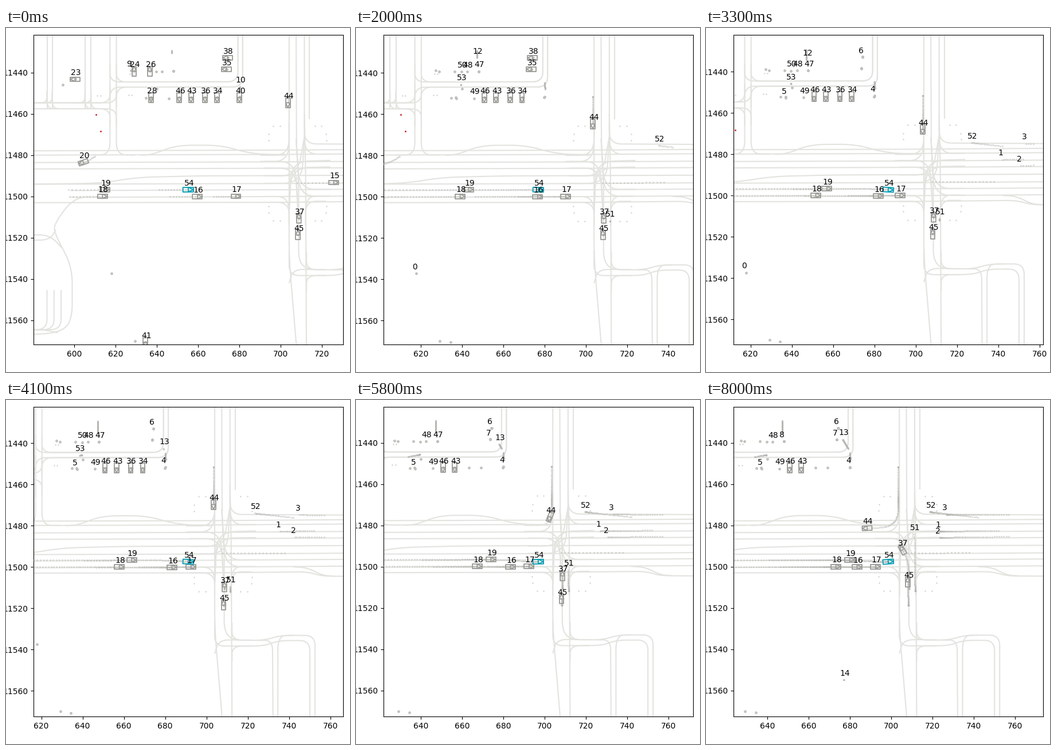
Recreate the animation shown at these times as a matplotlib script. Size 600 px wide and 600 px high, loop 8100 ms.

```python
import numpy as np
import matplotlib.pyplot as plt
from matplotlib.animation import FuncAnimation
from matplotlib.collections import LineCollection, PolyCollection

FRAMES, STEP = 81, 100
Y0 = 11400          # all y values below are relative to this northing
SPAN = 75           # half width of the view
PX = 0.72           # points per pixel
LANE, GREY, EGO = "#e3e3df", "#9c9c98", "#0a9fb6"
TRAIL, DOT, DOT_EDGE, SIGNAL = "#b6b6b2", "#cacac6", "#b2b2ae", "#d6d6d2"
WEST, EAST = 560, 790
UP, DOWN, LEFT, RIGHT = -90, 90, 180, 0

fig = plt.figure(figsize=(6, 6), dpi=100, facecolor="white")
ax = fig.add_axes([0.08, 0.08, 0.9, 0.9])


def rounded(points, r):
    """Polyline whose corners are replaced with sampled quadratic curves."""
    p = np.array(points, float)
    out = [p[:1]]
    u = np.linspace(0, 1, 13)[:, None]
    for a, b, c in zip(p, p[1:], p[2:]):
        start, end = (b + (q - b) * min(r / np.hypot(*(q - b)), .5) for q in (a, c))
        out.append(start * (1 - u) ** 2 + b * 2 * u * (1 - u) + end * u ** 2)
    return np.concatenate(out + [p[-1:]])


# ---- road map ----
lanes = []


def lane(*points, r=5):
    lanes.append(rounded(points, r) + (0, Y0))


# east-west main road
for y in (77.9, 80, 83.6, 86.7, 94.1, 97.1, 100.4):
    lane((WEST if y < 97 else 598, y), (700, y - .4), (EAST, y - 1))
lane((WEST, 103), (700, 102.8), (749, 102.3), (756, 104.4), (EAST, 104.6))
lane((742, 99.9), (749, 100.3), (756, 104), (762, 104.4))
lane((WEST, 94.2), (612, 93.6), (631, 90.7), (660, 90), (EAST, 89.5), r=8)
lane((632, 80), (638, 79.6), (649, 75.2), (671, 75.1), (685, 79.2), (702, 80), r=8)

# northern side streets
for x in (586.7, 589.2, 605.1, 608):
    lane((x, 0), (x, 57.5))
    lane((x, 49), (x, 54.6), (x - 6, 54.6))
    lane((x, 49), (x, 57.5), (x + 6, 57.5))
for x, side in ((617.2, -1), (620.3, 1)):
    lane((x, 0), (x, 79.7), (x + 9 * side, 79.9), r=6)
    lane((WEST, 54.6), (x, 54.6), (x, 46))
    lane((WEST, 57.5), (x, 57.5), (x, 66))
    lane((x, 36), (x, 44.5), (679.2, 44.4), (679.2, 0))
    lane((x, 57), (x, 47), (681.5, 46.9), (681.5, 0))

# western service road
lane((612, 100.2), (600, 100.2), (590.2, 113), (590.4, 118), (598.9, 134),
     (598.9, 160), (593, 166), (WEST, 168), r=8)
lane((WEST, 118.6), (588, 118.6), (594, 125))
lane((WEST, 121.1), (588, 121.1), (591, 116))
lane((WEST, 164.5), (585, 164.5), (592, 166))
for x in (586.7, 590.1, 593.5):
    lane((x, 145.3), (x, 164.4), (x - 12, 164.6))

# north-south road
lane((704, 0), (704, 130), (709, 190), r=10)
lane((707.3, 0), (707.6, 76), (708.6, 92), (708.6, 131), (712.5, 135.4),
     (728, 135.5), (736, 133.1), (752.6, 133.1), (752.6, 200))
lane((711.4, 0), (711.4, 74.5), (EAST, 74.9), r=6)
lane((711.4, 60), (712, 90), (712.5, 200))
lane((713.9, 0), (713.9, 62.6))

# south-eastern block
lane((704, 126), (704, 138.3), (728, 138.2), (735, 135.6), (750.1, 135.6), (750.1, 200))
lane((704, 142), (706, 135.3), (716, 135.3))
lane((712.4, 127), (712.4, 135.4), (722, 135.4))
lane((712.4, 146), (712.4, 138.3), (722, 138.3))
lane((725, 135.5), (732, 135.5), (732.4, 200))
lane((742, 133.1), (734.6, 133.3), (734.6, 200), r=7)

# turning lanes of the crossing, one pair for each movement
for k in (0, 1):
    lane((704, 64), (704, 80 + 3 * k), (690, 80 + 3 * k), r=9)
    lane((707.4, 72), (709, 96.5 + 3.3 * k), (724, 96.5 + 3.3 * k), r=9)
    lane((708.6, 112), (707, 83 + 3.2 * k), (692, 83 + 3.2 * k), r=9)
    lane((712, 114), (712, 99.8 + 2.5 * k), (722, 99.8 + 2.5 * k), r=9)
    lane((724, 82.5 + 3.2 * k), (705, 83 + 3 * k), (704, 108), r=9)
    lane((692, 100 + 2.8 * k), (704, 100 + 2.8 * k), (704, 114), r=9)
    lane((692, 90 + 3.6 * k), (708 + 2 * k, 90 + 3.6 * k), (711.4, 71), r=9)
lane((724, 79.4), (711.4, 79.5), (711.4, 64), r=9)

ax.add_collection(LineCollection(lanes, colors=LANE, linewidths=2.1 * PX, zorder=1),
                  autolim=False)


def dots(points, color, px, edge="none", edge_px=0):
    x, y = np.transpose(points)
    ax.plot(x, y + Y0, "o", ms=px * PX, mfc=color, mec=edge, mew=edge_px * PX, zorder=3)


# signal heads: the same four at each corner of the crossing
corners = [(sx, sy) for sx in (-1, 1) for sy in (-1, 1)]
dots([(708 + sx * dx, 88.8 + sy * dy) for sx, sy in corners
      for dx, dy in ((8.5, 23), (11.7, 23), (14, 16), (13.9, 19))], SIGNAL, 2.6)
dots([(x + dx, y) for x, y in ((611.1, 51.2), (626.2, 50.8), (626.7, 40.6))
      for dx in (0, 1.5)], SIGNAL, 2.6)
dots([(610.3, 60.3), (612.6, 68.3)], "#d01010", 2.8)


# ---- motion: distance travelled by time t on a route of given length ----
def brake(duration, since=-1, distance=None):
    def pace(t, length):
        left = np.clip(1 - (t - since) / duration, 0, 1)
        return (distance or length) * (1 - left ** 2.3)
    return pace


def speed_up(since, rate):
    return lambda t, length: rate * np.maximum(t - since, 0) ** 2


def cruise(speed, since=-1):
    return lambda t, length: speed * (t - since)


def brake_then_go(t, length):
    return brake(5, -.4, 17)(t, length) + speed_up(3, .95)(t, length)


class Agent:
    def __init__(self, name, route, pace=None, heading=None, car=False, show=(0, 9)):
        self.route = rounded(route, 9 if car else 4)
        steps = np.hypot(*np.diff(self.route, axis=0).T)
        self.mileage = np.concatenate([[0], np.cumsum(steps)])
        self.pace, self.heading, self.show = pace, heading, show
        self.car = car or heading is not None
        self.since = show[0] if show[0] > 1 else -1
        self.label = ax.text(0, 0, str(name), fontsize=10, clip_on=True, zorder=6)

    def at(self, s):
        return np.stack([np.interp(s, self.mileage, c) for c in self.route.T], -1)

    def travelled(self, t):
        length = self.mileage[-1]
        return np.clip(self.pace(t, length), 0, length) if self.pace else 0 * t

    def pos(self, t):
        return self.at(self.travelled(t))

    def direction(self, t):
        if self.heading is not None:
            return np.radians(self.heading)
        s = self.travelled(t)
        dx, dy = self.at(s + .5) - self.at(s - .5)
        return np.arctan2(dy, dx)

    def trail(self, t):
        return self.pos(np.arange(self.since, min(t, self.show[1]) + 1e-6, STEP / 1000))

    def shapes(self, t, length=4.7, width=2.15):
        a, l, w = self.direction(t), length / 2, width / 2
        turn = np.array([[np.cos(a), np.sin(a)], [-np.sin(a), np.cos(a)]])
        body = np.array([(-l, -w), (l, -w), (l, w), (-l, w)])
        nose = np.array([(0, -w), (l, 0), (0, w)])
        shift = self.pos(t) + (0, Y0)
        return [body @ turn + shift, nose @ turn + shift]


ego = Agent(54, [(640.9, 96.8), (677, 96.5), (696, 97.7), (700, 97.4)][:3] + [(698.6, 97.5)],
            brake(8.65), car=True)
agents = [ego]


def add(*args, **kw):
    agents.append(Agent(*args, **kw))


def parked(name, x, y, heading, until=9):
    add(name, [(x, y)], heading=heading, show=(0, until))


def standing(name, x, y, since=0, until=9):
    add(name, [(x, y)], show=(since, until))


# parked cars
for name, x, until in ((28, 637.1, .5), (46, 650.8, 9), (43, 656.5, 9),
                       (36, 663.3, 5.8), (34, 669.1, 4.2), (40, 679.9, 1.5)):
    parked(name, x, 52, DOWN, until)
parked(24, 628.9, 39.3, UP, .5)
parked(26, 636.5, 39.3, UP, .5)
parked(38, 674.2, 32.8, LEFT, 2.6)
parked(35, 673.6, 38.3, LEFT, 2.6)
parked(23, 600.3, 43.2, LEFT, .5)
parked(41, 634.4, 170.6, DOWN, .4)

# standing people
standing(9, 627.3, 38.9, 0, .5)
standing(0, 617.8, 137.3, .4, 4.1)
standing(50, 639.7, 39.5, 1.4, 5.8)
standing(48, 642.5, 39.4, .5)
standing(47, 648, 39.3, .5, 7.3)
standing(8, 648, 39.3, 7.3)
standing(49, 645.8, 52.4, .5)
standing(5, 637.2, 52.6, 2.6)
standing(6, 674.4, 32.9, 2.6)
standing(7, 673.7, 38.4, 4.2)
standing(4, 680.1, 51.6, 2.6)

# eastbound queue: every car brakes to its place at the stop line
for name, start, stop, y, duration in ((19, 597, 680.5, 96.6, 10.15),
                                       (18, 597.7, 674, 99.9, 10.4),
                                       (16, 646.4, 683.5, 100.1, 5.75),
                                       (17, 667.4, 692.5, 99.9, 4.6)):
    add(name, [(start, y), (stop, y)], brake(duration), RIGHT)
add(15, [(708, 93.3), (760, 93)], cruise(17.6), RIGHT, show=(0, .7))

# turning and crossing cars
add(20, [(609.8, 80.6), (604, 84), (590, 86)], cruise(6.2), car=True, show=(0, 1.3))
add(44, [(703.4, 51.6), (703.4, 80.5), (684, 81.5)], brake_then_go, car=True)
add(37, [(708.7, 110.5), (708.6, 97), (702, 86)], speed_up(3, .77), car=True)
add(45, [(708.3, 118.6), (707.9, 95)], speed_up(3.5, .56), UP)

# westbound riders, then people on foot
for name, start, stop, since, duration in (
        (52, (742, 76), (719, 73.4), 1.2, 5.7), (3, (757, 74.8), (726.5, 74.6), 3, 5.75),
        (1, (752, 82.4), (723.5, 82.8), 2.3, 5.8), (2, (757, 85.3), (723, 85.8), 2.8, 6.25)):
    add(name, [start, stop], brake(duration, since), show=(since, 9))
add(51, [(711.6, 111.8), (711.2, 80)], speed_up(2.4, .88), show=(1.4, 9))
add(53, [(639.6, 45.7), (634, 46.7)], speed_up(2.8, .7), show=(1.4, 5.8))
add(12, [(647.2, 29.3), (647.2, 36)], cruise(1.15), show=(.3, 4.1))
add(10, [(680.3, 48), (679.9, 44)], cruise(1.3), show=(0, 1.5))
add(13, [(679.2, 42.8), (676.4, 38)], cruise(1.3, 3.9), show=(3.9, 9))
add(14, [(677.1, 154.7), (677.3, 154.7)], cruise(.1, 7.6), show=(7.6, 9))

resting = [a.pos(0.) for a in agents if not a.pace]
dots(resting + [(594.2, 45.8), (629.2, 170), (634.7, 52.2), (640, 47.8)],
     DOT, 3.6, DOT_EDGE, 0.9)

trails, = ax.plot([], [], "o", ms=3.2 * PX, mfc=TRAIL, mew=0, alpha=0.45, zorder=3)
boxes, ego_box = (PolyCollection([], facecolors="none", edgecolors=color,
                                 linewidths=1.9 * PX, zorder=z)
                  for color, z in ((GREY, 4), (EGO, 5)))
for part in (boxes, ego_box):
    ax.add_collection(part, autolim=False)


def update(i):
    t = i * STEP / 1000
    cx, cy = ego.pos(t) + (.05, Y0)
    ax.set_xlim(cx - SPAN, cx + SPAN)
    ax.set_ylim(cy + SPAN, cy - SPAN)

    points, shapes = [], []
    for agent in agents:
        if agent.pace and agent.since <= t:
            points.append(agent.trail(t))
        shown = agent.show[0] <= t + 1e-6 < agent.show[1]
        agent.label.set_visible(shown)
        if shown:
            x, y = agent.pos(t)
            agent.label.set_position((x - 2, y + Y0 - 2))
            if agent.car and agent is not ego:
                shapes += agent.shapes(t)
    x, y = np.concatenate(points).T
    trails.set_data(x, y + Y0)
    boxes.set_verts(shapes)
    ego_box.set_verts(ego.shapes(t, 5.1, 2.2))
    return []


anim = FuncAnimation(fig, update, frames=FRAMES, interval=STEP, repeat=True,
                     repeat_delay=0, blit=False)
plt.show()
```
